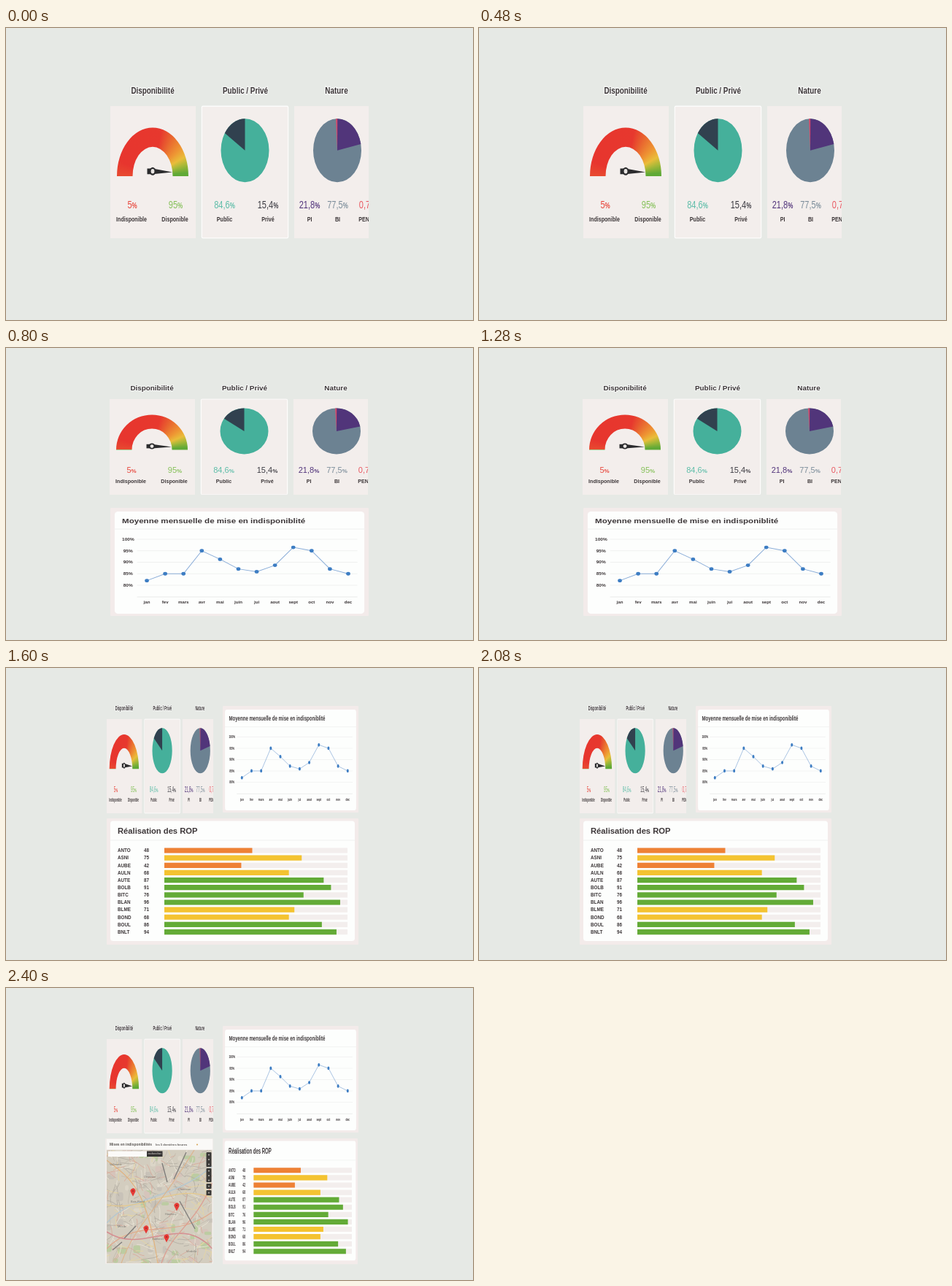
An HTML page with a canvas for the animation above (3200 ms loop, 640x400 px).

```html
<!DOCTYPE html>
<html lang="fr">
<head>
<meta charset="utf-8">
<title>Tableau de bord</title>
<style>
  html, body { margin: 0; width: 100%; height: 100%; overflow: hidden; background: #e6e9e5; }
  canvas { display: block; filter: blur(.6px); }
</style>
</head>
<body>
<canvas id="stage" width="640" height="400"></canvas>
<script>
const ctx = document.getElementById('stage').getContext('2d');
const STEP = 800;
const FONT = '"Liberation Sans", Arial, sans-serif';
const INK = '#3c3638', PANEL = '#f3eeec', WHITE = '#fdfefd';

function box(x, y, w, h, color, radius = 0) {
  ctx.fillStyle = color;
  ctx.beginPath();
  ctx.roundRect(x, y, w, h, radius);
  ctx.fill();
}

function line(points, color, width = 1) {
  ctx.strokeStyle = color;
  ctx.lineWidth = width;
  ctx.beginPath();
  points.forEach(([x, y]) => ctx.lineTo(x, y));
  ctx.stroke();
}

function curve(points, color, width) {
  const [[ax, ay], [bx, by], [cx, cy], [dx, dy]] = points;
  ctx.strokeStyle = color;
  ctx.lineWidth = width;
  ctx.beginPath();
  ctx.moveTo(ax, ay);
  ctx.bezierCurveTo(bx, by, cx, cy, dx, dy);
  ctx.stroke();
}

function disc(x, y, r, color) {
  ctx.fillStyle = color;
  ctx.beginPath();
  ctx.arc(x, y, r, 0, 7);
  ctx.fill();
}

function text(str, x, y, size, { color = INK, weight = 'bold', align = 'left', halo = false } = {}) {
  ctx.font = `${weight} ${size}px ${FONT}`;
  ctx.textAlign = align;
  ctx.textBaseline = 'alphabetic';
  const base = y + size * 0.36;
  if (halo) {
    ctx.strokeStyle = 'rgba(255,255,255,.6)';
    ctx.lineWidth = 2;
    ctx.strokeText(str, x, base);
  }
  ctx.fillStyle = color;
  ctx.fillText(str, x, base);
}

// Draws a panel at a position with its own horizontal and vertical scale.
function place(draw, x, y, sx = 1, sy = 1) {
  ctx.save();
  ctx.translate(x, y);
  ctx.scale(sx, sy);
  draw();
  ctx.restore();
}

function gauge(x, y) {
  const fill = ctx.createConicGradient(Math.PI, x, y);
  [[0, '#e84a30'], [.05, '#e7352e'], [.29, '#e7382e'], [.34, '#e8622f'], [.40, '#ee9533'],
   [.435, '#e9bd3a'], [.46, '#a9b938'], [.49, '#5fa936'], [.6, '#5fa936']]
    .forEach(([at, color]) => fill.addColorStop(at, color));
  ctx.fillStyle = fill;
  ctx.beginPath();
  ctx.ellipse(x, y, 49, 48, 0, Math.PI, 0);
  ctx.ellipse(x, y, 27.5, 29, 0, 0, Math.PI, true);
  ctx.fill();

  const hubY = y - 4.8;
  box(x - 7.5, hubY - 2.8, 6, 5.6, '#2b2b2d');
  ctx.beginPath();
  ctx.moveTo(x, hubY - 2.8);
  ctx.lineTo(x + 27, hubY + .8);
  ctx.lineTo(x, hubY + 2.8);
  ctx.fill();
  disc(x, hubY, 4, '#2b2b2d');
  disc(x, hubY, 2.4, '#e9e5e3');
}

function pie(x, y, base, slices) {
  const sector = (from, to, color) => {
    ctx.fillStyle = color;
    ctx.beginPath();
    ctx.moveTo(x, y);
    ctx.ellipse(x, y, 33, 31.5, 0, (from - .25) * 2 * Math.PI, (to - .25) * 2 * Math.PI);
    ctx.fill();
  };
  sector(0, 1, base);
  slices.forEach(slice => sector(...slice));
}

function figure(x, number, color, label, labelX = x) {
  ctx.font = `11px ${FONT}`;
  const w = ctx.measureText(number).width;
  const left = x - (w + 7.1) / 2;
  text(number, left, 97.4, 11, { color, weight: 'normal' });
  text('%', left + w, 98.3, 8, { color });
  text(label, labelX, 112.1, 7.1, { align: 'center' });
}

function indicators() {
  ctx.beginPath();
  ctx.rect(-2, -30, 356, 165);
  ctx.clip();
  [['Disponibilité', 58], ['Public / Privé', 185], ['Nature', 310]]
    .forEach(([title, x]) => text(title, x, -15.9, 9.9, { align: 'center', halo: true }));
  box(0, 0, 117, 131, PANEL);
  box(124.8, -.3, 119.4, 131.4, '#fff', 2);
  box(125.8, .5, 117.4, 129.9, PANEL, 1);
  box(252, 0, 104, 131, PANEL);

  gauge(58, 69.4);
  pie(184.5, 43.9, '#45b09b', [[.842, 1, '#31414f']]);
  pie(311, 43.9, '#6c8292', [[0, .218, '#51357a'], [.991, 1.001, '#d8486a']]);

  figure(30, '5', '#e8493f', 'Indisponible', 29);
  figure(89.5, '95', '#86c15a', 'Disponible', 88.5);
  figure(156.5, '84,6', '#5dbda8', 'Public');
  figure(216, '15,4', '#3d3c43', 'Privé');
  figure(273, '21,8', '#52357b', 'PI');
  figure(311.5, '77,5', '#7d8e9b', 'BI');
  figure(352, '0,7', '#e85a63', 'PEN', 347.5);
}

const MONTHS = ['jan', 'fev', 'mars', 'avr', 'mai', 'juin', 'jui', 'aout', 'sept', 'oct', 'nov', 'dec'];
const RATES = [82, 85, 85, 95, 91.3, 87.1, 85.9, 88.7, 96.5, 95, 87.1, 85];

function monthlyChart() {
  box(0, 0, 300, 148, '#f3ebea', 1);
  box(5, 5, 290, 140, WHITE, 4);
  text('Moyenne mensuelle de mise en indisponiblité', 13.6, 17, 9.8);
  line([[5, 29], [295, 29]], '#f0f1ef');
  const rateY = v => 43 + (100 - v) * 3.15;
  for (let v = 100; v >= 80; v -= 5) {
    line([[31, rateY(v)], [287, rateY(v)]], '#f0f1f0');
    text(v + '%', v === 100 ? 13.6 : 15, rateY(v), 5.5);
  }
  line([[31, 122], [287, 122]], '#e9ebe9');
  const points = RATES.map((v, i) => [42.4 + i * 21.26, rateY(v)]);
  line(points, '#8aadd8', .9);
  points.forEach(([x, y], i) => {
    disc(x, y, 2.4, '#3d7dc3');
    text(MONTHS[i], x, 129.5, 5.2, { align: 'center' });
  });
}

const ROWS = [['ANTO', 48], ['ASNI', 75], ['AUBE', 42], ['AULN', 68], ['AUTE', 87], ['BOLB', 91],
  ['BITC', 76], ['BLAN', 96], ['BLME', 71], ['BOND', 68], ['BOUL', 86], ['BNLT', 94]];

function ranking() {
  box(0, 0, 345, 173, '#f3ebea', 1);
  box(5, 3.5, 335, 164.5, WHITE, 4);
  text('Réalisation des ROP', 15, 16.6, 11.2);
  line([[5, 30], [340, 30]], '#f0f1ef');
  ROWS.forEach(([code, value], i) => {
    const y = 44 + i * 10.14;
    const color = value < 50 ? '#ee8135' : value <= 75 ? '#f4c331' : '#63ab37';
    text(code, 15, y, 6.3);
    text(String(value), 51, y, 6.3);
    box(79, y - 3.6, 251, 7.2, '#f3eeed');
    box(79, y - 3.6, 251 * value / 100, 7.2, color);
  });
}

function seeded(seed) {
  return () => (seed = (seed * 16807) % 2147483647) / 2147483647;
}

function streets(w, h) {
  const rnd = seeded(4127);
  box(0, 0, w, h, '#d3cdbf');
  for (let i = 0; i < 90; i++) {
    const color = ['#bccca2', '#dcd6c8', '#c8c2b8', '#d6c4bb'][i % 4];
    box(rnd() * w - 6, rnd() * h - 4, 4 + rnd() * 11, 4 + rnd() * 8, color, 3);
  }
  for (let i = 0; i < 320; i++) {
    const x = rnd() * w, y = rnd() * h, a = rnd() * 6.3, r = 7 + rnd() * 18;
    const color = ['#e9e4d6', '#b3ada3', '#e6d5a2', '#d9ab9b', '#c3bcae'][i % 5];
    curve([[x, y], [x + r * Math.cos(a) / 3, y + r * Math.sin(a) / 3],
      [x + r * Math.cos(a + .4) * .7, y + r * Math.sin(a + .4) * .7],
      [x + r * Math.cos(a + .2), y + r * Math.sin(a + .2)]], color, .9);
  }
  curve([[0, 100], [35, 60], [90, 70], [w, 22]], '#b6c7cf', 1.5);
  curve([[0, 14], [35, 40], [55, 55], [70, 155]], '#e2b27c', 1.2);
  curve([[0, 75], [50, 85], [90, 45], [w, 65]], '#e5c98c', 1.2);
  curve([[0, 135], [45, 90], [90, 125], [w, 85]], '#e0a98d', 1.2);
  curve([[20, h], [40, 100], [65, 90], [120, 0]], '#dcb58e', 1.2);
  curve([[0, 112], [50, 145], [100, 85], [w, 135]], '#d58f92', 1.5);
  curve([[75, h], [90, 110], [120, 105], [w, 45]], '#dc9f92', 1.3);
  [[[109, 3], [92, 40]], [[76, 18], [83, 44]], [[24, 121], [40, 104]], [[100, 70], [121, 108]], [[8, 137], [21, 126]]]
    .forEach(track => line(track, '#807e7c', 1.4));
  ['Valbrume', 'Orsevant', 'Clairnoue', 'Bois-Rond', 'Hautlieu', 'Mirelle', 'Sablonet', 'Verdolle']
    .forEach((town, i) => text(town, 4 + (i * 47) % 112, 20 + i * 17, 4, { color: '#777570', weight: 'normal' }));
}

function pin(x, y) {
  ctx.fillStyle = '#e53a35';
  ctx.beginPath();
  ctx.arc(x, y - 2, 3.5, Math.PI * .85, Math.PI * .15);
  ctx.lineTo(x, y + 5.5);
  ctx.fill();
  disc(x, y - 2, 1, '#a32624');
}

function outageMap() {
  box(0, 0, 148, 172, '#f1edea', 1);
  box(2, 1, 145, 14, '#faf9f7');
  text('Mises en indisponibilités', 6, 8.5, 4.9, { color: '#5b5754' });
  text('les 5 dernières heures', 69, 8.5, 4.1, { color: '#5b5754' });
  disc(126, 8.5, 1.1, '#d9a85e');
  ctx.save();
  ctx.translate(2, 16);
  ctx.beginPath();
  ctx.rect(0, 0, 144.5, 155);
  ctx.clip();
  streets(144.5, 155);
  ctx.restore();

  box(4, 17.5, 53, 7.5, '#fbfaf8');
  box(57, 17.5, 21.5, 7.5, '#353332');
  text('rechercher', 67.7, 21.2, 3.6, { color: '#b9b5b2', align: 'center' });
  [[19, 20], [41, 19], [62, 7], [71, 7]].forEach(([y, h]) => {
    box(138.5, y, 7, h, '#3a3937', 1);
    for (let d = 3.5; d < h; d += 6.5) disc(142, y + d, .9, '#c9c5c0');
  });
  [[38, 74], [98, 94], [56, 125], [84, 137]].forEach(([x, y]) => pin(x, y));
}

const smallTop = () => {
  place(indicators, 138, 70, .4124, .985);
  place(monthlyChart, 297, 52, .62, .986);
};

const SCENES = [
  () => place(indicators, 143, 107, 1, 1.382),
  () => {
    place(indicators, 142, 70);
    place(monthlyChart, 143, 219, 1.18, 1);
  },
  () => {
    smallTop();
    place(ranking, 138, 206);
  },
  () => {
    smallTop();
    place(outageMap, 136, 206);
    place(ranking, 297, 206, .5362, .995);
  }
];

let shown = -1;
function tick() {
  const scene = Math.floor(performance.now() / STEP) % SCENES.length;
  if (scene !== shown) {
    shown = scene;
    box(0, 0, 640, 400, '#e6e9e5');
    SCENES[scene]();
  }
  requestAnimationFrame(tick);
}
tick();
</script>
</body>
</html>
```
